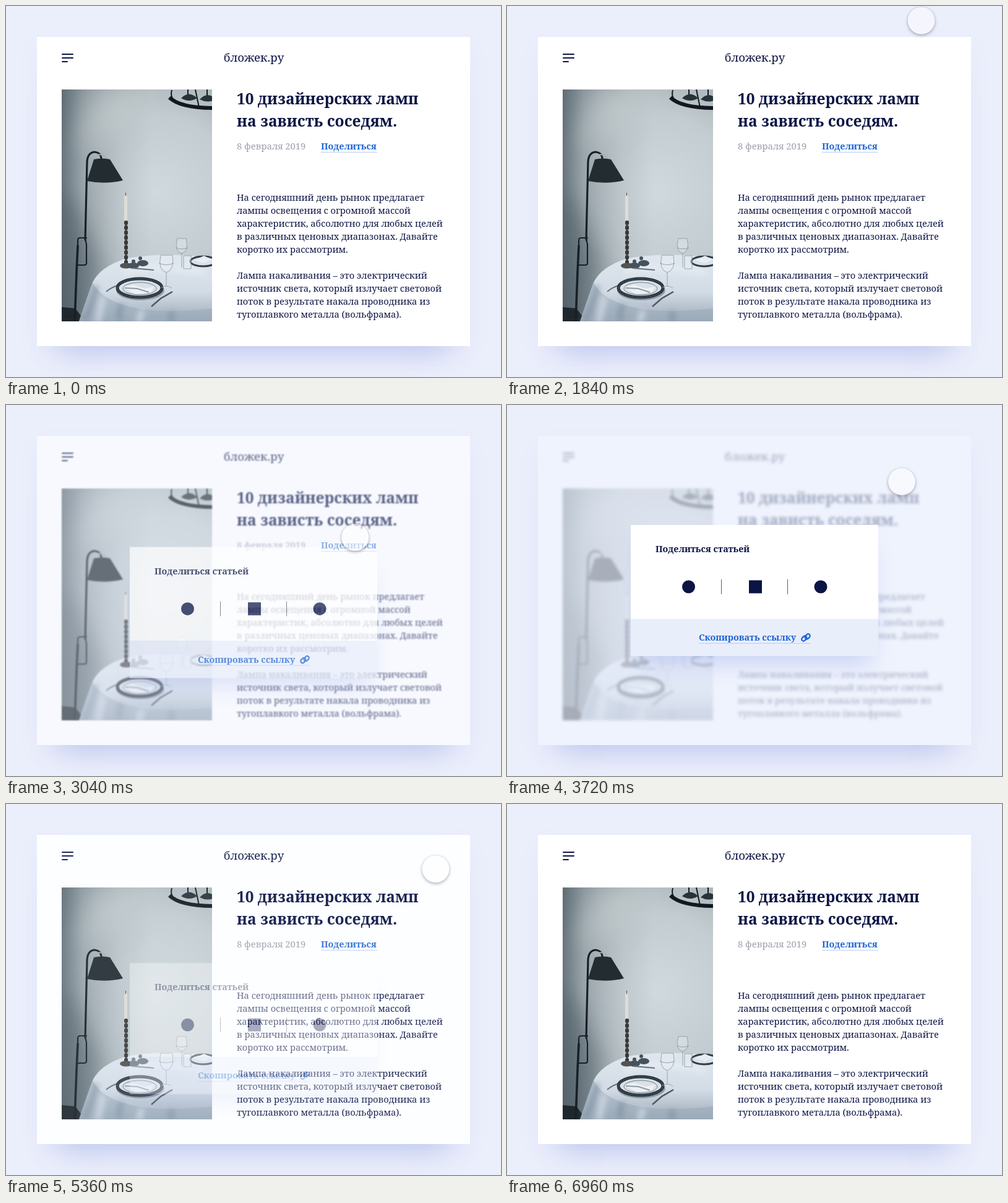
These frames come from a looping animation (800x600 px, 7000 ms). An HTML page:

```html
<!DOCTYPE html>
<html lang="ru">
<head>
<meta charset="utf-8">
<title>Поделиться статьей</title>
<style>
  html, body { margin: 0; width: 100%; height: 100%; overflow: hidden; background: #ebeefb; }
  #stage { position: relative; width: 800px; height: 600px; overflow: hidden; background: #ebeefb; }
  svg { position: absolute; left: 0; top: 0; display: block; }
  text { font-family: "Noto Serif", serif; fill: #0b1444; white-space: pre; }
  .card {
    position: absolute; left: 50px; top: 50px; width: 700px; height: 500px; background: #fff;
    box-shadow: 0 46px 44px -38px rgba(105, 128, 215, .36), 0 14px 34px -4px rgba(150, 165, 230, .08);
  }
  .brand { font-size: 18.7px; text-anchor: middle; }
  .title { font-size: 24.5px; font-weight: 700; }
  .body { font-size: 14.65px; }
  .date { font-size: 14.8px; fill: #9b9fac; }
  .bold { font-size: 14.3px; font-weight: 700; }
  .link { fill: #1c64d3; }
  #cursor {
    position: absolute; left: -22px; top: -22px; width: 44px; height: 44px; border-radius: 50%;
    background: rgba(255, 255, 255, .5);
    box-shadow: 0 2px 5px rgba(40, 42, 66, .34), 0 0 2px rgba(40, 42, 66, .2);
  }
</style>
</head>
<body>
<div id="stage">
  <div class="card"></div>

  <svg id="article" width="800" height="600" viewBox="0 0 800 600">
    <defs>
      <clipPath id="frame"><rect x="90" y="135" width="243" height="375"/></clipPath>
      <radialGradient id="wall" gradientUnits="userSpaceOnUse" cx="245" cy="300" r="245">
        <stop offset="0" stop-color="#d0d9dd"/>
        <stop offset=".5" stop-color="#c3ccd0"/>
        <stop offset="1" stop-color="#97a3a8"/>
      </radialGradient>
      <linearGradient id="side">
        <stop offset="0" stop-color="#33424c" stop-opacity=".6"/>
        <stop offset=".14" stop-color="#4a5963" stop-opacity=".34"/>
        <stop offset=".4" stop-color="#56646d" stop-opacity=".1"/>
        <stop offset=".6" stop-color="#56646d" stop-opacity="0"/>
      </linearGradient>
      <linearGradient id="cloth" x1="0" y1="0" x2="0" y2="1">
        <stop offset="0" stop-color="#dfe6ee"/>
        <stop offset=".55" stop-color="#d3dce6"/>
        <stop offset="1" stop-color="#9dabb9"/>
      </linearGradient>
      <filter id="soft" x="-50%" y="-50%" width="200%" height="200%"><feGaussianBlur stdDeviation="5"/></filter>
      <filter id="wide" x="-50%" y="-50%" width="200%" height="200%"><feGaussianBlur stdDeviation="18"/></filter>
    </defs>

    <path d="M91 78h17M91 84h17M91 90h8" stroke="#0b1444" stroke-width="2" stroke-linecap="round" fill="none"/>
    <text class="brand" x="400.500" y="90">бложек.ру</text>

    <g clip-path="url(#frame)" fill="none">
      <rect x="90" y="135" width="243" height="375" fill="url(#wall)"/>
      <rect x="90" y="135" width="243" height="375" fill="url(#side)"/>
      <path d="M140 135L245 135L170 210L115 230Z" fill="#ccd4d5" opacity=".5" filter="url(#wide)"/>
      <path d="M80 290L118 330L150 410L130 520H80Z" fill="#44525c" opacity=".5" filter="url(#wide)"/>
      <path d="M90 487L112 489L128 510H90Z" fill="#20272c"/>

      <g stroke="#12191d">
        <path d="M264 148Q282 165 336 165" stroke-width="6"/>
        <path d="M268 136Q265 147 272 152M306 135L312 164M294 135V145M325 135V145" stroke-width="2"/>
        <path d="M283 149Q296 136 309 149Q296 157 283 149ZM313 151Q326 137 339 151Q326 158 313 151Z"
              fill="#26343a" stroke="none"/>
      </g>

      <g stroke="#172026" stroke-linecap="round">
        <path d="M128 378L131 252Q132 237 143 236Q153 237 154 246" stroke-width="3.2"/>
        <path d="M130 375H119Q116 375 116 380V390M128 376L130 386V416Q130 419 126 419H114" stroke-width="2.2"/>
        <path d="M116 388L114 430L111 510" stroke-width="3.6"/>
        <path d="M147 241Q157 238 163 247" stroke="#a6afb0" stroke-width="2"/>
        <path d="M142 248Q155 245 168 248L189 282Q161 289 131 283Z" fill="#222c31" stroke="none"/>
      </g>

      <path d="M118 510Q130 474 140 447Q152 422 192 409Q250 397 333 407V510Z" fill="url(#cloth)"/>
      <path d="M118 510Q130 474 140 447Q158 484 235 492Q285 495 333 489V510Z" fill="#9aa9b8" opacity=".55"/>
      <g filter="url(#soft)" stroke-width="9">
        <path d="M146 452Q140 480 126 510M187 482Q181 496 184 510M267 494V512" stroke="#7b8c9c" opacity=".65"/>
        <path d="M157 470L148 512M220 492L214 512" stroke="#dae2eb" opacity=".75"/>
        <path d="M190 430Q240 416 320 430" stroke="#edf2f7" opacity=".6"/>
      </g>

      <path d="M191 348V309Q194 300 196 309V348Z" fill="#dcded6"/>
      <path d="M193.500 302v5" stroke="#4d4f4c"/>
      <path d="M194 347V420" stroke="#4c4b49" stroke-width="4"/>
      <path d="M194 348V418" stroke="#383a3b" stroke-width="6" stroke-dasharray="5 3"/>
      <ellipse cx="194" cy="420" rx="10" ry="4.500" fill="#54534f"/>

      <g fill="#46525b">
        <ellipse cx="206" cy="420" rx="9" ry="5"/><circle cx="206" cy="413" r="3"/>
        <ellipse cx="221" cy="416" rx="9" ry="5"/><circle cx="217" cy="408" r="3"/>
      </g>
      <path d="M204 424L239 427M162 462Q170 455 183 451" stroke="#66727c" stroke-width="2"/>

      <ellipse cx="319" cy="413" rx="21" ry="8" fill="#dbe1e8" stroke="#323d47" stroke-width="3"/>
      <path d="M304 411L320 404L333 410L320 416Z" fill="#e8edf2"/>
      <ellipse cx="217" cy="460" rx="39" ry="16" fill="#6f7e8c" opacity=".65"/>
      <ellipse cx="216" cy="456" rx="36" ry="15" fill="#d9e0e8" stroke="#29343d" stroke-width="5"/>
      <ellipse cx="216" cy="456" rx="36" ry="15" stroke="#8e9ba6" stroke-width="1" stroke-dasharray="1 2"/>
      <ellipse cx="216" cy="457" rx="27" ry="10" stroke="#707e8b"/>
      <path d="M190 455L205 451L224 457L239 454L234 464L209 466Z" fill="#eef1f3"/>
      <path d="M192 456L212 457L231 463" stroke="#8f9aa4" stroke-width="2"/>
      <path d="M235 486L250 473L269 462" stroke="#4d5963" stroke-width="2.500"/>

      <g stroke="#8997a1" stroke-opacity=".8" fill="#e6edf1" fill-opacity=".4">
        <path d="M250 403Q245 427 259 431Q273 427 269 403ZM259 431V454M251 455Q260 451 268 456"/>
        <path d="M277 376Q271 397 284 400Q296 397 291 376ZM284 400V423"/>
        <path d="M287 404V425H299V404Z"/>
      </g>
      <path d="M247 416Q259 421 271 416M275 391Q284 395 294 391" stroke="#66757f" opacity=".6"/>
    </g>

    <g id="copy"></g>
  </svg>

  <svg width="800" height="600" viewBox="0 0 800 600">
    <rect id="veil" x="50" y="50" width="700" height="500" fill="#e7eefc"/>
    <g id="modal">
      <rect x="212" y="230" width="376" height="188" fill="#8598e4" opacity=".36" filter="url(#wide)"/>
      <rect x="200" y="194" width="400" height="152" fill="#fff"/>
      <rect x="200" y="346" width="400" height="60" fill="#e9eefb"/>
      <text class="bold" x="240" y="238">Поделиться статьей</text>
      <g fill="#0b1444">
        <circle cx="293.500" cy="294" r="10.500"/>
        <rect x="391" y="283.500" width="21" height="21"/>
        <circle cx="507" cy="294" r="10.500"/>
      </g>
      <path d="M346.500 282v24M453.500 282v24" stroke="#5b5e6b"/>
      <text class="bold link" x="310" y="381">Скопировать ссылку</text>
      <path d="M310 385.500H491" stroke="#b9cdf0"/>
      <g transform="translate(483 376) rotate(-45)" fill="none" stroke="#1c64d3" stroke-width="2.200">
        <rect x="-7.500" y="-3.800" width="9" height="6" rx="3"/>
        <rect x="-1.500" y="-2.200" width="9" height="6" rx="3"/>
      </g>
    </g>
    <g id="share">
      <text class="bold link" x="509" y="232">Поделиться</text>
      <path d="M509 236.500H600" stroke="#b9cdf0"/>
    </g>
  </svg>

  <div id="cursor"></div>
</div>

<script>
  const LOOP = 7000;
  const $ = id => document.getElementById(id);
  const clamp = v => Math.min(1, Math.max(0, v));
  const span = (t, a, b) => clamp((t - a) / (b - a));
  const smooth = p => p * p * (3 - 2 * p);
  const inOut = p => p < .5 ? 2 * p * p : 1 - 2 * (1 - p) ** 2;
  const mix = (a, b, p) => a + (b - a) * p;

  function addLines(cls, y, step, lines) {
    lines.forEach((line, i) => {
      const el = document.createElementNS('http://www.w3.org/2000/svg', 'text');
      el.setAttribute('class', cls);
      el.setAttribute('x', 373);
      el.setAttribute('y', y + i * step);
      el.textContent = line;
      $('copy').append(el);
    });
  }

  addLines('title', 159, 36, ['10 дизайнерских ламп', 'на зависть соседям.']);
  addLines('date', 232, 0, ['8 февраля 2019']);
  addLines('body', 315, 21, [
    'На сегодняшний день рынок предлагает',
    'лампы освещения с огромной массой',
    'характеристик, абсолютно для любых целей',
    'в различных ценовых диапазонах. Давайте',
    'коротко их рассмотрим.',
    '',
    'Лампа накаливания – это электрический',
    'источник света, который излучает световой',
    'поток в результате накала проводника из',
    'тугоплавкого металла (вольфрама).'
  ]);

  // Pointer legs: start, end, from, bend, to, easing
  const legs = [
    [1640, 2360, [674, -33], [674, 120], [552, 229], smooth],
    [2860, 3620, [552, 229], [595, 176], [638, 124], smooth],
    [3720, 4760, [638, 124], [665, 125], [692, 123], inOut],
    [5200, 5880, [692, 123], [696, 85], [710, 50], p => p],
    [5880, 6640, [710, 50], [722, 12], [735, -34], p => p]
  ];

  function pointerAt(t) {
    const leg = legs.filter(l => t >= l[0]).pop() || legs[0];
    const [start, end, a, b, c, ease] = leg;
    const p = ease(span(t, start, end));
    return [0, 1].map(i => mix(mix(a[i], b[i], p), mix(b[i], c[i], p), p));
  }

  function render(t) {
    const open = inOut(span(t, 2840, 3240)) - inOut(span(t, 5120, 5440));
    $('article').style.filter = open > 0 ? `blur(${2.2 * open}px)` : 'none';
    $('veil').setAttribute('opacity', .68 * open);
    $('modal').setAttribute('opacity', Math.sqrt(open));
    $('modal').setAttribute('transform', `translate(0 ${72 * (1 - open)})`);
    $('share').setAttribute('opacity', 1 - open);

    const [x, y] = pointerAt(t);
    const press = 1 - .06 * Math.sin(Math.PI * span(t, 2640, 2880));
    $('cursor').style.transform = `translate(${x}px, ${y}px) scale(${press})`;
  }

  const began = performance.now();
  function tick() {
    render((performance.now() - began) % LOOP);
    requestAnimationFrame(tick);
  }
  render(0);
  requestAnimationFrame(tick);
</script>
</body>
</html>
```
